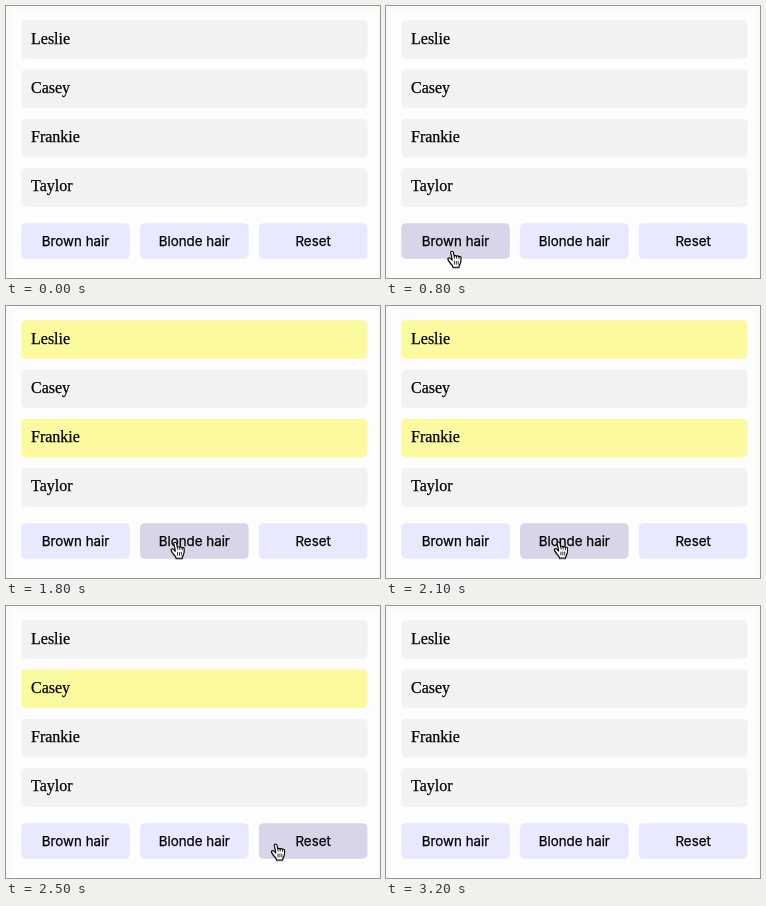
These frames come from a looping animation (374x272 px, 5.1 s). An HTML page:

```html
<!DOCTYPE html>
<html lang="en">
<head>
<meta charset="utf-8">
<title>Highlight by hair colour</title>
<style>
  html, body { margin: 0; width: 100%; height: 100%; overflow: hidden; background: #fafafa; }
  svg { display: block; width: 374px; height: 272px; }
  text { stroke: #000; stroke-width: .25px; }
  .name { font: 16px "Liberation Serif", "Times New Roman", serif; }
  .label { font: 13.333px Inter, sans-serif; text-anchor: middle; }
  #cursor { filter: drop-shadow(0 1px .7px rgba(0, 0, 0, .3)); }
  #cursor path { stroke: #000; stroke-width: 1.1; stroke-linejoin: round; stroke-linecap: round; }
</style>
</head>
<body>
<svg viewBox="0 0 374 272">
  <rect x="5" y="4" width="366" height="268" fill="#fdfdfd"/>
  <g id="list"></g>
  <g id="buttons"></g>
  <g id="cursor">
    <g id="hand">
      <path fill="#fff" d="M0 0C-.9 0 -1.4 .6 -1.3 1.4L.1 8V9C-.6 8.2 -1.5 7.1 -2.3 6.8C-3.1 6.4 -4.1 6.8 -4.2 7.5C-4.2 8.2 -3.5 9 -3 9.9C-2.2 11.2 -1.4 12.4 -.2 13.4C.5 14 .8 14.6 .9 16H7C7 14.7 7.5 13.8 8 12.9C8.8 11.5 9 9.7 9 7.9V6.5C9 5.1 7.4 5 7 5.8C6.8 4.5 5 4.2 4.6 5.3C4.3 4.2 2.5 4.1 2.2 5L1.4 1.2C1.2 .4 .7 0 0 0Z"/>
      <path fill="none" d="M2.2 5l.4 2.2M4.6 5.3v1.9M7 5.8v1.7M2.4 10v3M4.3 10v3M6.2 10v3" style="stroke-width:.8"/>
    </g>
    <path id="arrow" fill="#000" style="stroke:#fff" d="M0 0V14L3.2 11L5.2 15.5L7.2 14.6L5.2 10.1H9.6Z"/>
  </g>
</svg>
<script>
const LOOP = 5100, TICK = 100, LEAVE = 3200;
const GREY = '#f2f2f2', YELLOW = '#fbfa9f', LAVENDER = '#e8e8fe', HOVER = '#d7d5e7';
const $ = id => document.getElementById(id);

function add(parent, tag, attrs, text = '') {
  const el = document.createElementNS('http://www.w3.org/2000/svg', tag);
  for (const key in attrs) el.setAttribute(key, attrs[key]);
  el.textContent = text;
  parent.append(el);
  return el;
}

const people = { Leslie: 'brown', Casey: 'blonde', Frankie: 'brown', Taylor: 'black' };
const rows = Object.entries(people).map(([name, hair], i) => {
  const box = add($('list'), 'rect', { x: 15.4, y: 14.2 + 49.3 * i, width: 346.2, height: 38.6, rx: 4.5 });
  add($('list'), 'text', { x: 25, y: 38 + 49 * i, class: 'name' }, name);
  return { box, hair };
});

const BUTTON = { width: 108.5, height: 35.6, top: 217.2 };
const buttons = ['Brown hair', 'Blonde hair', 'Reset'].map((label, i) => {
  const x = 15.3 + 118.8 * i;
  const box = add($('buttons'), 'rect', { x, y: BUTTON.top, width: BUTTON.width, height: BUTTON.height, rx: 4.5 });
  add($('buttons'), 'text', { x: x + BUTTON.width / 2, y: 240, class: 'label' }, label);
  return { box, x };
});

const easeOut = power => p => 1 - (1 - p) ** power;
const easeInOut = p => p < .5 ? 4 * p ** 3 : 1 - 4 * (1 - p) ** 3;

// Fingertip moves; sag bows the path downwards
const moves = [
  { from: 500, to: 800, x: 66, y: 245.2, ease: easeOut(3), sag: 0 },
  { from: 1500, to: 2100, x: 172.5, y: 236, ease: easeOut(5), sag: 0 },
  { from: 2200, to: 2700, x: 303, y: 234.8, ease: easeInOut, sag: 4 }
];
const clicks = [{ at: 1300, hair: 'brown' }, { at: 2200, hair: 'blonde' }, { at: 3000, hair: null }];

function pointerAt(t) {
  let x = 60, y = 285;
  for (const move of moves) {
    const p = move.ease(Math.min(1, Math.max(0, (t - move.from) / (move.to - move.from))));
    x += (move.x - x) * p;
    y += (move.y - y) * p + move.sag * Math.sin(Math.PI * p);
  }
  return { x, y };
}

const show = (id, visible) => $(id).setAttribute('display', visible ? 'inline' : 'none');

function draw(t) {
  const { x, y } = pointerAt(t);
  const present = t < LEAVE;
  const inRow = present && y >= BUTTON.top && y <= BUTTON.top + BUTTON.height;
  const hovered = buttons.find(b => inRow && x >= b.x && x <= b.x + BUTTON.width);
  const picked = clicks.findLast(click => click.at <= t)?.hair;

  for (const { box, hair } of rows) box.setAttribute('fill', hair === picked ? YELLOW : GREY);
  for (const b of buttons) b.box.setAttribute('fill', b === hovered ? HOVER : LAVENDER);
  $('cursor').setAttribute('transform', `translate(${x} ${y})`);
  show('cursor', present);
  show('hand', hovered);
  show('arrow', !hovered);
}

const start = performance.now();
function frame() {
  const t = (performance.now() - start) % LOOP;
  draw(Math.floor(t / TICK) * TICK);
  requestAnimationFrame(frame);
}
frame();
</script>
</body>
</html>
```
